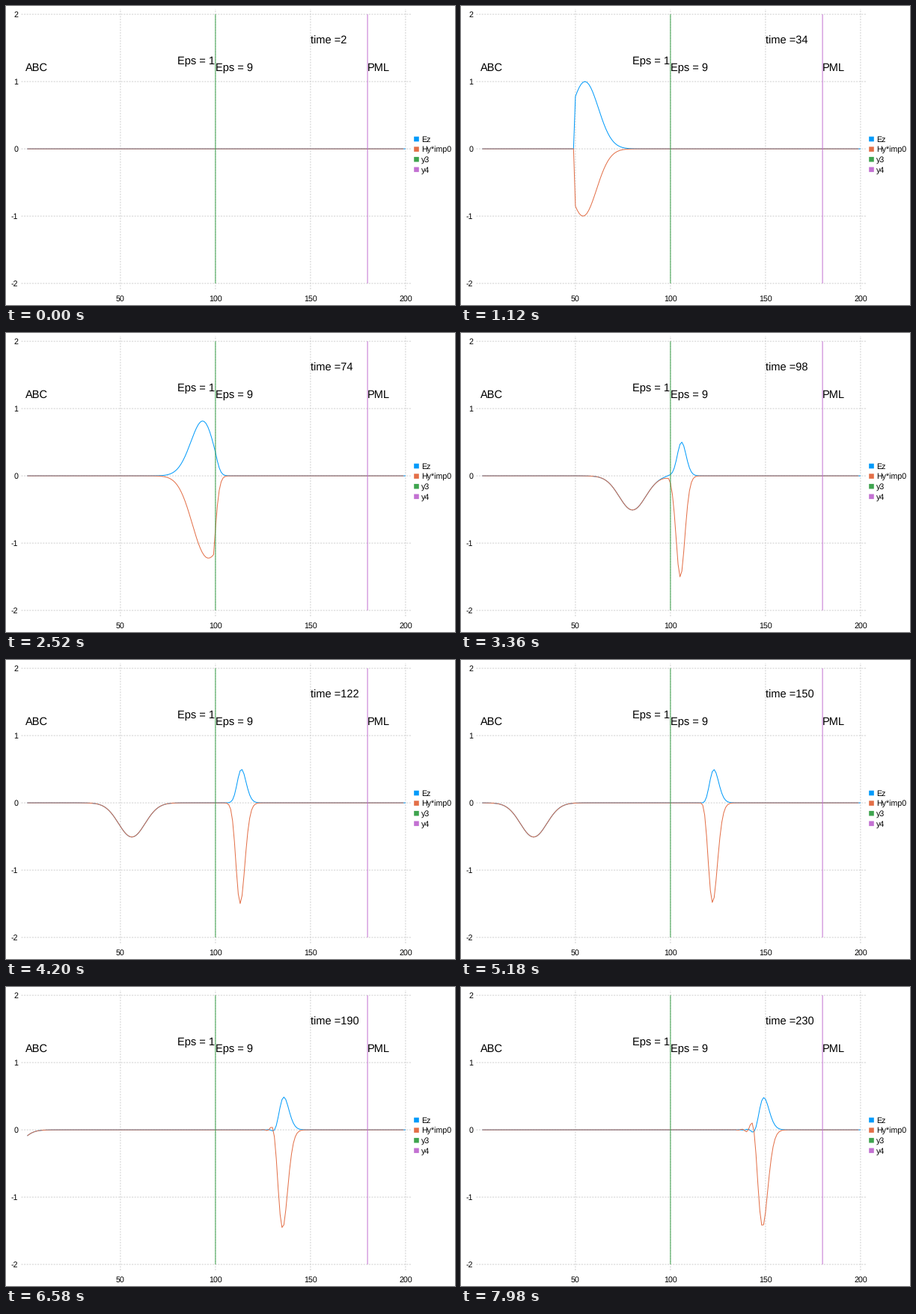
Animation, 600 px wide and 400 px high, one loop 8000 ms. Source, as a matplotlib script:

```python
import numpy as np
import matplotlib.pyplot as plt
from matplotlib.animation import FuncAnimation

plt.rcParams["font.family"] = "Liberation Sans"
plt.rcParams["text.hinting"] = "none"

W, H, DPI = 600, 400, 100
PX = 72 / DPI                 # one pixel in points
LOOP, TICK, HOLD = 8000, 20, 70
STEPS = 115
N, SRC, SLAB, PML = 200, 50, 100, 180

BLUE, ORANGE, GREEN, PURPLE = "#009afa", "#e36f47", "#3ea44e", "#c371d2"


def sx(x):
    return 25.9 + 2.54 * np.asarray(x)


def sy(y):
    return 191.1 - 90 * np.asarray(y)


def pulse(t):
    return np.exp(-((t - 30) ** 2) / 100)


def simulate():
    """1D FDTD pulse; h is the magnetic field times the impedance."""
    e, h = np.zeros(N + 1), np.zeros(N + 1)   # cell 0 unused
    eps = np.where(np.arange(N + 1) < SLAB, 1.0, 9.0)
    shots = []
    for t in range(1, 2 * STEPS + 1):
        h[1:N] += e[2:] - e[1:N]
        h[SRC - 1] -= pulse(t)
        e[1] = e[2]                            # absorbing left edge
        e[2:N] += (h[2:N] - h[1:N - 1]) / eps[2:N]
        e[SRC] += pulse(t + 1)
        if t % 2 == 0:
            shots.append((e[1:].copy(), h[1:N].copy()))
    return shots


shots = simulate()
cells = sx(np.arange(1, N + 1))

fig = plt.figure(figsize=(W / DPI, H / DPI), dpi=DPI, facecolor="white")
ax = fig.add_axes([0, 0, 1, 1])
ax.set_xlim(0, W)
ax.set_ylim(H, 0)
ax.axis("off")


def label(x, y, s, size, ha="left"):
    return ax.text(x, y, s, fontsize=size * PX, ha=ha, va="baseline",
                   color="black", zorder=5)


def line(color, z, xs=(), ys=()):
    return ax.plot(xs, ys, color=color, lw=PX, zorder=z, snap=False,
                   solid_capstyle="butt", solid_joinstyle="round")[0]


def grid(xs, ys):
    ax.plot(xs, ys, color="#cfcfcf", lw=PX, zorder=1, dashes=(2, 1.6),
            dash_capstyle="butt", snap=False)


SMALL, BIG = 10.67, 14.67

for v in (50, 100, 150, 200):
    grid([sx(v)] * 2, [379, 4])
    label(sx(v), 395, str(v), SMALL, "center")
for v in range(-2, 3):
    grid([20.5, 541], [sy(v)] * 2)
    label(16.3, sy(v) + 4, str(v), SMALL, "right")

ez = line(BLUE, 2)
hy = line(ORANGE, 2.1)
line(GREEN, 3, [sx(SLAB)] * 2, sy([-2, 2]))
line(PURPLE, 3, [sx(PML)] * 2, sy([-2, 2]))

label(sx(0), 87, "ABC", BIG)
label(sx(80), 78, "Eps = 1", BIG)
label(sx(100), 87, "Eps = 9", BIG)
label(sx(180), 87, "PML", BIG)
clock = label(sx(150), 51, "", BIG)

names = ("Ez", "Hy*imp0", "y3", "y4")
for i, (name, color) in enumerate(zip(names, (BLUE, ORANGE, GREEN, PURPLE))):
    y = 178 + 13.6 * i
    ax.add_patch(plt.Rectangle((545.2, y - 3.3), 6.6, 6.6, fc=color,
                               ec="none", snap=False))
    label(555.3, y + 4, name, SMALL)


def draw(i):
    k = min((i * TICK + TICK // 2) // HOLD, STEPS - 1)
    e, h = shots[k]
    ez.set_data(cells, sy(e))
    hy.set_data(cells[:-1], sy(h))
    clock.set_text(f"time ={2 * k + 2}")
    return ez, hy, clock


anim = FuncAnimation(fig, draw, frames=LOOP // TICK, interval=TICK,
                     init_func=lambda: draw(0), repeat=True, repeat_delay=0,
                     blit=False)
plt.show()
```
